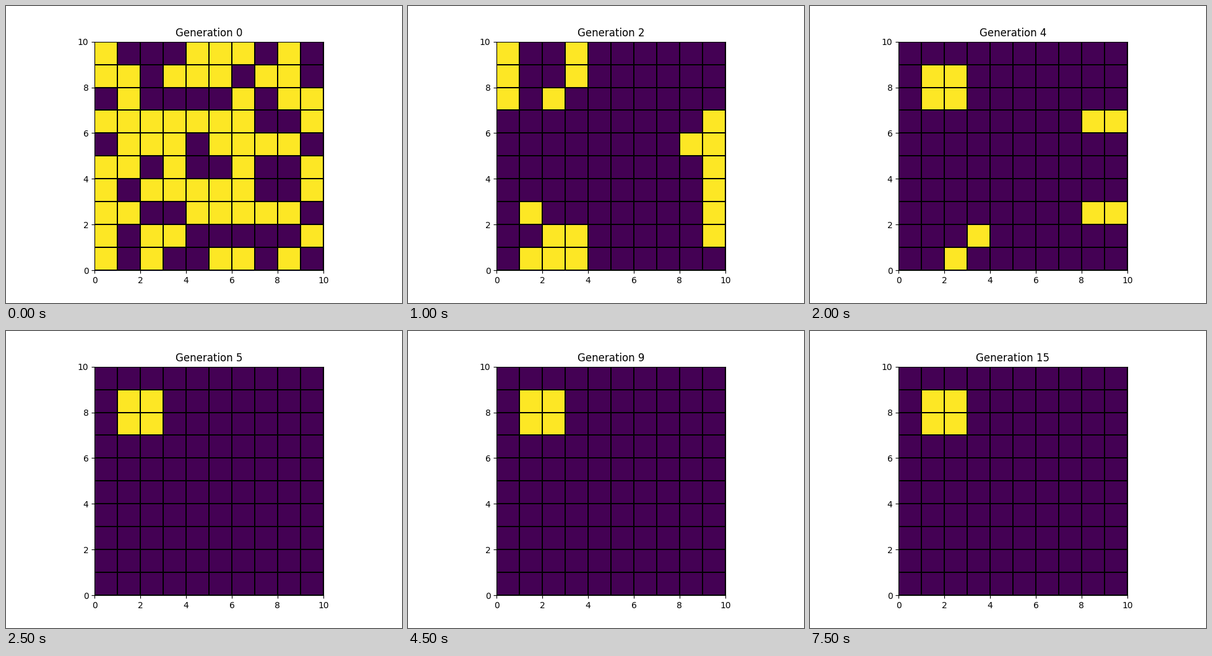
A matplotlib script for the animation above (8000 ms loop, 640 px wide and 480 px high).

```python
import matplotlib.pyplot as plt
import numpy as np
from matplotlib.animation import FuncAnimation

SIZE = 10
GENERATIONS = 16
# Columns of the dead cells at the start, one word per row from the top.
DEAD = "12379 269 023457 78 049 24578 178 239 145678 13479".split()


def first_generation():
    cells = np.ones((SIZE, SIZE), int)
    for row, columns in enumerate(DEAD):
        cells[SIZE - 1 - row, [int(c) for c in columns]] = 0
    return cells


def step(cells):
    """Advance Conway's Game of Life with dead cells beyond the border."""
    padded = np.pad(cells, 1)
    block = sum(padded[i:i + SIZE, j:j + SIZE]
                for i in range(3) for j in range(3))
    return ((block == 3) | ((cells == 1) & (block == 4))).astype(int)


history = [first_generation()]
while len(history) < GENERATIONS:
    history.append(step(history[-1]))

fig, ax = plt.subplots(figsize=(6.4, 4.8), dpi=100)
ax.set_aspect("equal")
# This width snaps to an even two pixels.
mesh = ax.pcolormesh(history[0], cmap="viridis", vmin=0, vmax=1,
                     edgecolors="k", linewidth=1.25)
title = ax.set_title("Generation 0")


def update(gen):
    mesh.set_array(history[gen])
    title.set_text(f"Generation {gen}")
    return mesh, title


anim = FuncAnimation(fig, update, frames=GENERATIONS, interval=500,
                     repeat=True, repeat_delay=0, blit=False)
plt.show()
```
